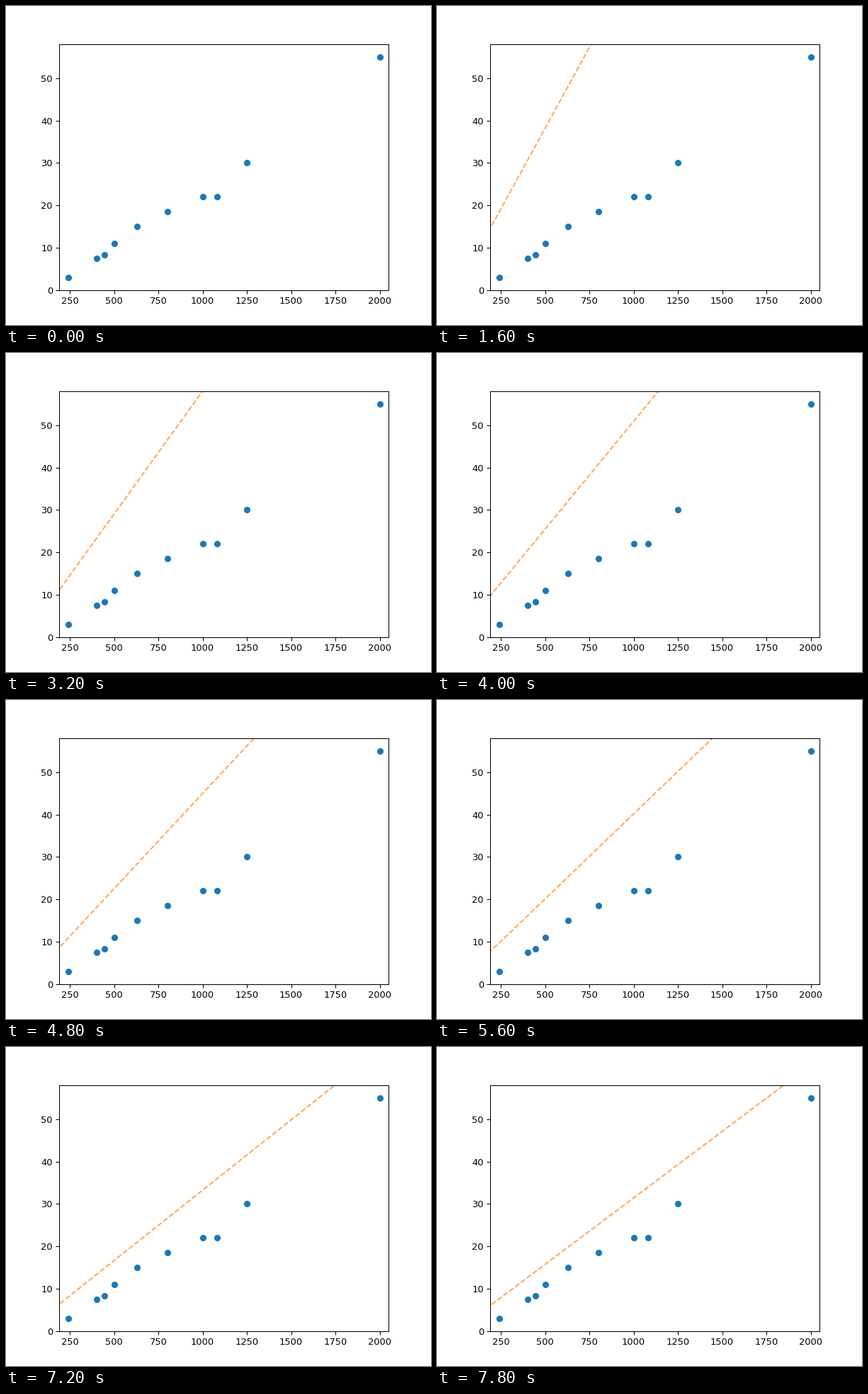
Recreate the animation shown at these times as a matplotlib script. Size 600 by 450 pixels, loop 8000 ms.

```python
import numpy as np
import matplotlib.pyplot as plt
from matplotlib.animation import FuncAnimation

FRAMES, INTERVAL = 40, 200
DPI = 93.75
START, BEST = 0.1, 0.0244

POINTS = [(240, 3), (400, 7.5), (445, 8.3), (500, 11), (630, 14.9),
          (800, 18.5), (1000, 22), (1080, 22), (1250, 30), (2000, 55)]


def slope(step):
    """Slope of the fitted line as it settles towards the best fit."""
    return BEST + (START - BEST) * np.exp(-0.0434 * step - 0.000452 * step**2)


x, y = np.array(POINTS).T
fig, ax = plt.subplots(figsize=(600 / DPI, 450 / DPI), dpi=DPI)
ax.scatter(x, y)
ax.set_xlim(x.min() - 50, x.max() + 50)
ax.set_ylim(0, y.max() + 3)

xs = np.array([0, 2100])
line, = ax.plot([], [], "--", color="tab:orange", alpha=0.7)


def init():
    line.set_data([], [])
    return line,


def update(step):
    if step == 0:
        return init()
    line.set_data(xs, slope(step) * xs)
    return line,


anim = FuncAnimation(fig, update, frames=FRAMES, init_func=init,
                     interval=INTERVAL, repeat=True, repeat_delay=0)
plt.show()
```
